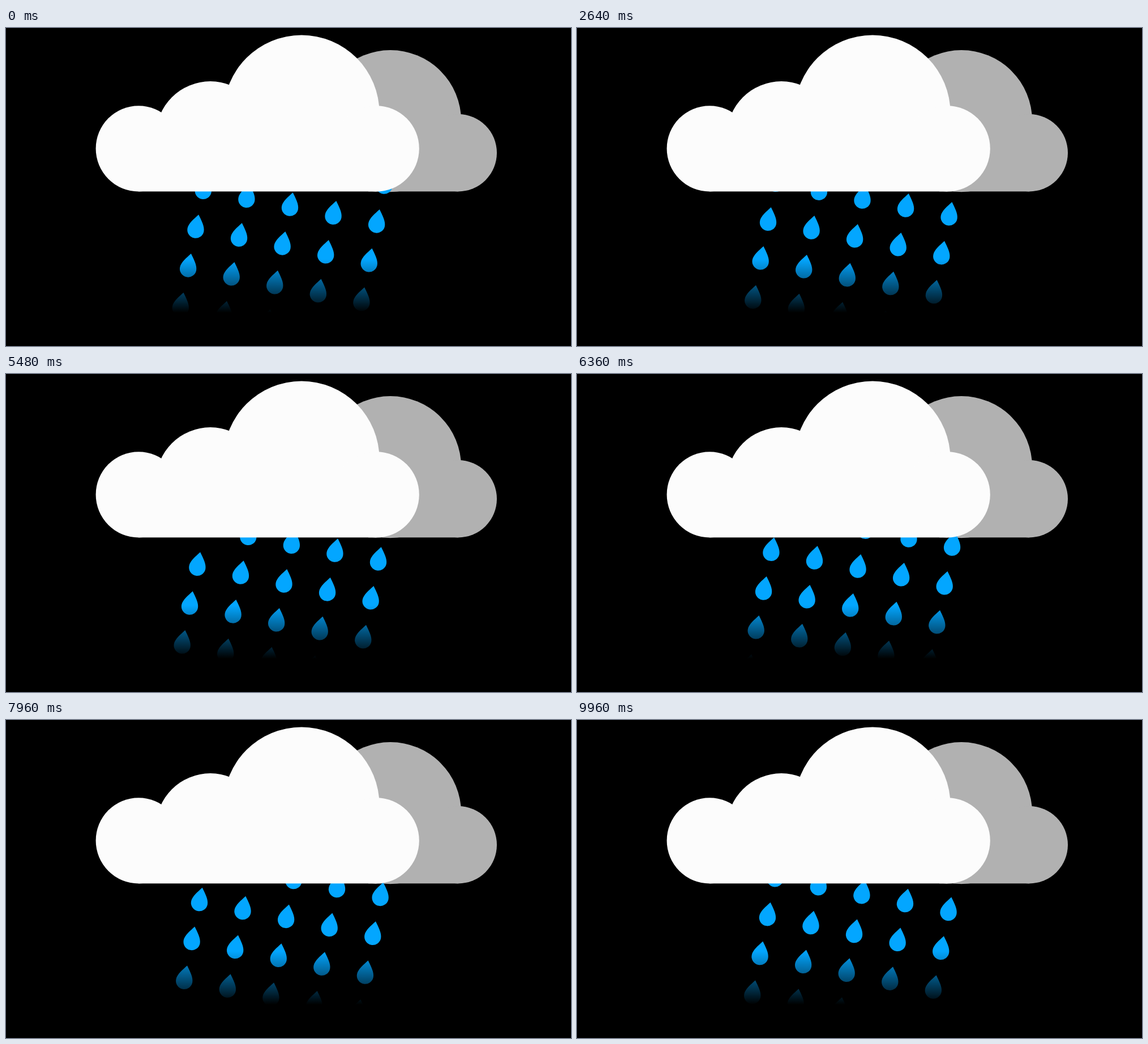
Recreate the animation shown at these times as an HTML page. Size 998x561 px, loop 10000 ms.

```html
<!DOCTYPE html>
<html lang="en">
<head>
<meta charset="utf-8">
<title>Rain cloud</title>
<style>
  html, body { margin: 0; width: 100%; height: 100%; overflow: hidden; background: #000; }
  svg { display: block; width: 100%; height: 100%; }
</style>
</head>
<body>
<svg viewBox="0 0 998 561">
  <defs>
    <linearGradient id="fade" gradientUnits="userSpaceOnUse" x1="0" y1="408" x2="0" y2="502" color-interpolation="sRGB">
      <stop offset="0" stop-color="#fff"/>
      <stop offset="1" stop-color="#000"/>
    </linearGradient>
    <mask id="rainMask" maskUnits="userSpaceOnUse" x="0" y="0" width="998" height="561">
      <rect width="998" height="561" fill="url(#fade)"/>
    </mask>
    <path id="drop" transform="rotate(11)" d="M0 -27.4C6.5 -18.6 14.7 -9 14.7 0A14.7 14.7 0 0 1 -14.7 0C-14.7 -9 -6.5 -18.6 0 -27.4Z"/>
  </defs>
  <g fill="#b1b1b1">
    <circle cx="679" cy="164.1" r="125.1"/>
    <circle cx="798.8" cy="220.2" r="68.2"/>
    <rect x="640" y="164" width="158.8" height="124.4"/>
  </g>
  <g mask="url(#rainMask)"><g id="rain" fill="#03a6ff"></g></g>
  <g fill="#fcfcfc">
    <circle cx="234.2" cy="212.8" r="75.6"/>
    <circle cx="361" cy="190.3" r="96.2"/>
    <circle cx="522" cy="150.1" r="137.6"/>
    <circle cx="654.2" cy="212.8" r="75.6"/>
    <rect x="234.2" y="200" width="420" height="88.4"/>
  </g>
</svg>
<script>
  const FRAME = 40, LOOP = 10000, CYCLE = 36, STEPS = 37;
  const origin = { x: 335, y: 356.1 };
  const col = { x: 76.57, y: 14.9 };
  const fall = { x: -13.35, y: 68.8 };
  const rain = document.getElementById('rain');

  for (let c = 0; c < 5; c++) {
    for (let r = -3; r <= 2; r++) {
      const drop = document.createElementNS('http://www.w3.org/2000/svg', 'use');
      drop.setAttribute('href', '#drop');
      drop.setAttribute('x', origin.x + c * col.x + r * fall.x);
      drop.setAttribute('y', origin.y + c * col.y + r * fall.y);
      rain.appendChild(drop);
    }
  }

  // The rain skips one step each time its short cycle restarts.
  function draw(ms) {
    const frame = Math.floor((ms % LOOP) / FRAME + 1e-6);
    const s = (frame % CYCLE) / STEPS;
    rain.setAttribute('transform', `translate(${s * fall.x} ${s * fall.y})`);
  }

  const start = performance.now();
  function tick() {
    draw(performance.now() - start);
    requestAnimationFrame(tick);
  }
  draw(0);
  requestAnimationFrame(tick);
</script>
</body>
</html>
```
